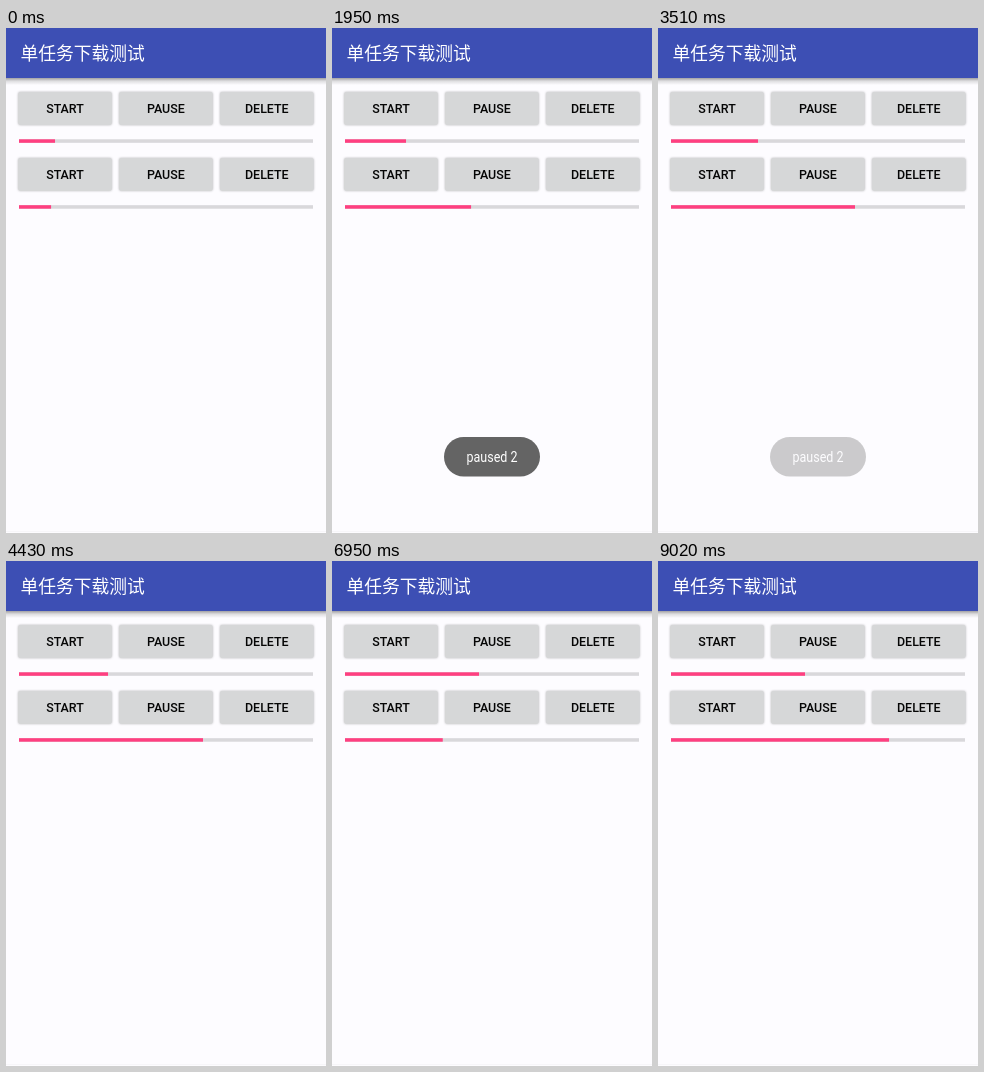
Recreate the animation shown at these times as an HTML page. Size 320x505 px, loop 9.05 s.

```html
<!DOCTYPE html>
<html lang="zh">
<head>
<meta charset="utf-8">
<title>单任务下载测试</title>
<style>
  html, body { margin: 0; width: 100%; height: 100%; overflow: hidden; background: #fdfcff; }
  svg { display: block; width: 320px; height: 505px; }
  .title { font: 400 17.78px "Noto Sans CJK SC", "Noto Sans CJK", sans-serif; fill: #fff; }
  .label { font: 500 12.44px Roboto, sans-serif; text-anchor: middle; fill: #050505; }
  .button { fill: #d6d7d8; filter: drop-shadow(0 .8px .8px rgba(0, 0, 0, .28)); }
  .track { fill: #d9d8db; }
  .fill { fill: #ff3f80; }
  .toast rect { fill: #646464; }
  .toast text { font: 400 14.22px Roboto, sans-serif; text-anchor: middle; fill: #fff; }
</style>
</head>
<body>
<svg viewBox="0 0 320 505">
  <defs>
    <linearGradient id="shade" x2="0" y2="1">
      <stop offset="0" stop-color="#000" stop-opacity=".36"/>
      <stop offset=".45" stop-color="#000" stop-opacity=".12"/>
      <stop offset="1" stop-color="#000" stop-opacity="0"/>
    </linearGradient>
  </defs>
  <rect width="320" height="505" fill="#fdfcff"/>
  <rect y="503" width="320" height="1" fill="#f7f6f9"/>
  <rect y="50" width="320" height="7" fill="url(#shade)"/>
  <rect width="320" height="50" fill="#3d4fb4"/>
  <text class="title" x="14.5" y="32">单任务下载测试</text>
  <g id="rows"></g>
  <g class="toast" id="toast" opacity="0">
    <rect y="409" height="39.4" rx="19.7"/>
    <text transform="translate(160 434.2) scale(.88 1)"></text>
  </g>
</svg>
<script>
const LOOP = 9050;
const LEFT = 13, RIGHT = 307;

// [time in ms, x of the bar's end]
const progress = [
  [[0, 49], [960, 63], [1950, 74], [3510, 100], [3640, 102], [4430, 102],
   [5810, 125], [6940, 147], [LOOP, 147]],
  [[0, 45], [700, 97], [1030, 97], [1590, 139], [1950, 139], [2690, 197],
   [5250, 197], [5250, 13], [5440, 13], [5810, 38], [6050, 56.5], [6980, 112.5],
   [7700, 152], [7910, 162], [8840, 219.5], [9020, 231], [LOOP, 232]]
];

const TOAST_LIFE = 860, FADE_IN = 130, FADE_OUT = 180;
// [start in ms, text, pill width]
const toasts = [
  [700, 'paused 2', 96],
  [1590, 'paused 2', 96],
  [2709, 'paused 2', 96],
  [5033, 'error 2', 82],
  [6997, 'paused 1', 96]
];

function add(parent, tag, attrs, text = '') {
  const el = document.createElementNS('http://www.w3.org/2000/svg', tag);
  for (const key in attrs) el.setAttribute(key, attrs[key]);
  el.textContent = text;
  return parent.appendChild(el);
}

function addRow(top) {
  const rows = document.getElementById('rows');
  ['START', 'PAUSE', 'DELETE'].forEach((name, i) => {
    const x = 12.2 + i * 100.9;
    add(rows, 'rect', { class: 'button', x, y: top, width: 93.6, height: 32.8, rx: 1.8 });
    add(rows, 'text', { class: 'label', x: x + 46.8, y: top + 21.1 }, name);
  });
  const bar = { x: LEFT, y: top + 47.2, height: 3.5 };
  add(rows, 'rect', { ...bar, class: 'track', width: RIGHT - LEFT });
  return add(rows, 'rect', { ...bar, class: 'fill', width: 0 });
}

function valueAt(steps, t) {
  const i = steps.findIndex(step => step[0] > t);
  const [t0, x0] = steps[i - 1], [t1, x1] = steps[i];
  return x0 + (x1 - x0) * (t - t0) / (t1 - t0);
}

const bars = [64.1, 130].map(addRow);
const toast = document.getElementById('toast');
const pill = toast.querySelector('rect');
const message = toast.querySelector('text');

function drawToast(t) {
  const current = toasts.find(([start]) => t >= start && t < start + TOAST_LIFE);
  if (!current) return toast.setAttribute('opacity', 0);
  const [start, text, width] = current;
  const age = t - start;
  toast.setAttribute('opacity', Math.min(1, age / FADE_IN, (TOAST_LIFE - age) / FADE_OUT));
  pill.setAttribute('x', 160 - width / 2);
  pill.setAttribute('width', width);
  message.textContent = text;
}

const began = performance.now();
function draw() {
  const t = (performance.now() - began) % LOOP;
  bars.forEach((bar, i) => bar.setAttribute('width', valueAt(progress[i], t) - LEFT));
  drawToast(t);
  requestAnimationFrame(draw);
}
draw();
</script>
</body>
</html>
```
